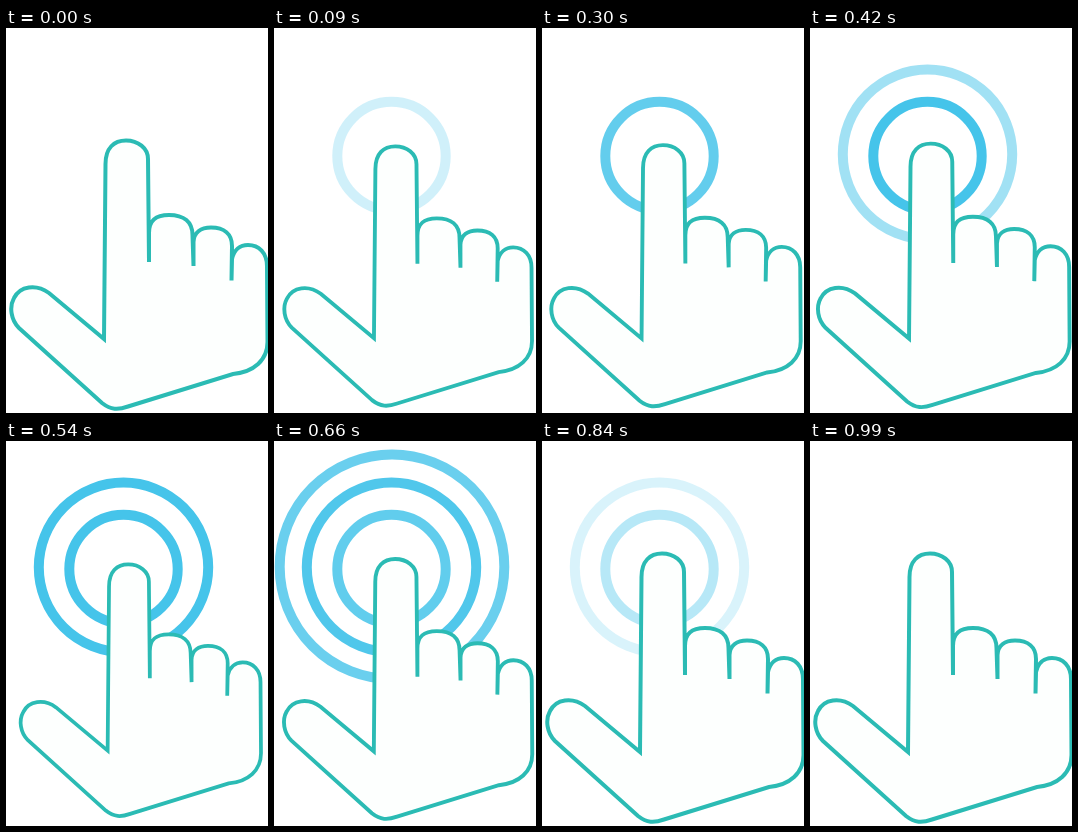
These frames come from a looping animation (262x385 px, 1320 ms). An HTML page:

```html
<!DOCTYPE html>
<html lang="en">
<head>
<meta charset="utf-8">
<title>Tap gesture</title>
<style>
  html, body { margin: 0; width: 100%; height: 100%; overflow: hidden; background: #fff; }
  svg { display: block; width: 100vw; height: 100vh; }
</style>
</head>
<body>
<svg viewBox="0 0 262 385">
  <g fill="none" stroke="#45c4ea" stroke-width="10">
    <circle class="ring" cx="117.5" cy="128" r="54.2"/>
    <circle class="ring" cx="117.5" cy="126.3" r="84.7"/>
    <circle class="ring" cx="118" cy="125.7" r="112.3"/>
  </g>
  <path id="hand" fill="#fdfffe" stroke="#2bbbb4" stroke-width="4" d="
    M98 311 L99.5 136 C99.5 120 108 112.5 120 112.5
    C132 112.5 142 120 142 131 L143 234
    V205 C143 192 150 187 163 187 C178 187 186.5 194 186.5 207 L187.5 238
    V214 C188 204 195 199.5 205 199.5 C218 199.5 226 206 226 218 L225.5 252.5
    L226 231 C228 222 234 217 242 217 C253 217 261 225 261 238
    L261.5 314 C261.5 332 248 344 227 346
    L122 378.5 C112 382 105 382 96 375
    L13 300 C5 292 3 279 8 270 C14 258 30 255.5 43 265 Z"/>
</svg>
<script>
  const LOOP = 1320, STEP = 30, HALF_PRESS = 186, PRESSES = 2;
  const hand = document.getElementById('hand');
  const rings = [...document.querySelectorAll('.ring')];
  // fade-in start and end, fade-out start and end, in ms
  const fades = [[0, 360, 600, 990], [300, 540, 645, 890], [540, 690, 690, 810]];

  const ramp = (t, a, b) => Math.min(1, Math.max(0, (t - a) / (b - a)));

  // triangle wave: 0 at rest, 1 fully pressed
  function press(t) {
    const phase = t / HALF_PRESS;
    return phase > 2 * PRESSES ? 0 : 1 - Math.abs(phase % 2 - 1);
  }

  function draw(now) {
    const t = Math.floor(now % LOOP / STEP) * STEP;
    const scale = 1 - 0.0687 * press(t);
    hand.setAttribute('transform', `translate(156.5 288) scale(${scale}) translate(-156.5 -288)`);
    rings.forEach((ring, i) => {
      const [a, b, c, d] = fades[i];
      ring.setAttribute('opacity', ramp(t, a, b) * (1 - ramp(t, c, d)));
    });
  }

  let start;
  function tick(now) {
    start ??= now;
    draw(now - start);
    requestAnimationFrame(tick);
  }
  draw(0);
  requestAnimationFrame(tick);
</script>
</body>
</html>
```
